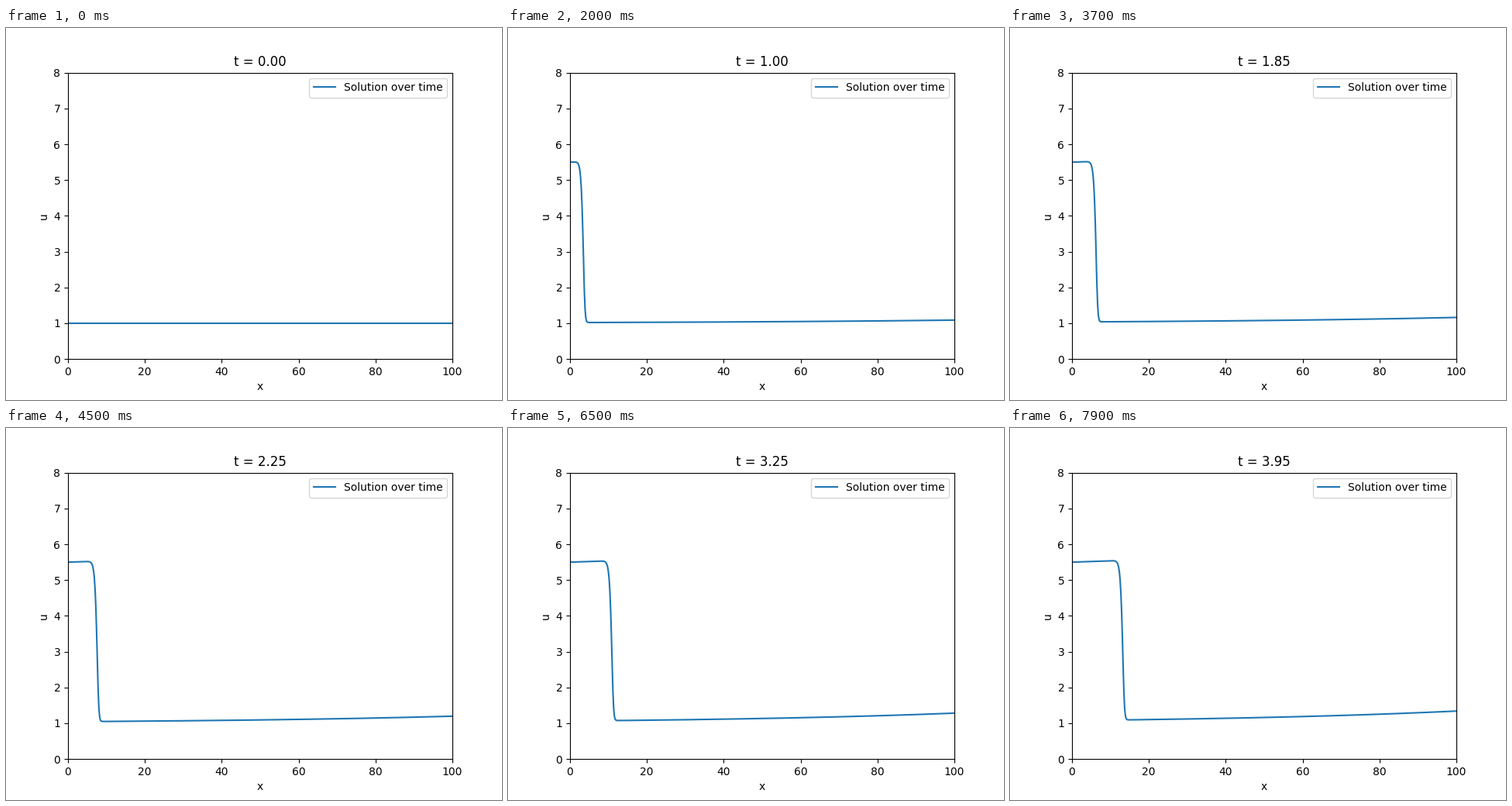
Animation, 640 px wide and 480 px high, one loop 8 s. Source, as a matplotlib script:

```python
import numpy as np
import matplotlib.pyplot as plt
from matplotlib.animation import FuncAnimation

LENGTH, NODES = 100.0, 512
DT, FRAMES = 0.05, 80
INFLOW, GROWTH = 5.5, 0.015

x = np.linspace(0, LENGTH, NODES)
source = 0.02 * np.exp(GROWTH * x)


def step(u):
    """One backward Euler upwind step of u_t + (u^2/2)_x = source."""
    k = DT / (2 * (x[1] - x[0]))
    rhs = u + DT * source
    new = np.empty_like(u)
    new[0] = INFLOW
    for i in range(1, NODES):
        c = rhs[i] + k * new[i - 1] ** 2
        new[i] = (np.sqrt(1 + 4 * k * c) - 1) / (2 * k)
    return new


states = [np.ones(NODES)]
while len(states) < FRAMES:
    states.append(step(states[-1]))

fig, ax = plt.subplots(figsize=(6.4, 4.8), dpi=100)
line, = ax.plot(x, states[0], label="Solution over time")
ax.set_xlim(0, LENGTH)
ax.set_ylim(0, 8)
ax.set_xlabel("x")
ax.set_ylabel("u")
title = ax.set_title("t = 0.00")
ax.legend(loc="upper right")


def update(i):
    line.set_ydata(states[i])
    title.set_text(f"t = {i * DT:.2f}")
    return line, title


anim = FuncAnimation(fig, update, frames=FRAMES, interval=100,
                     repeat=True, repeat_delay=0, blit=False)
plt.show()
```
